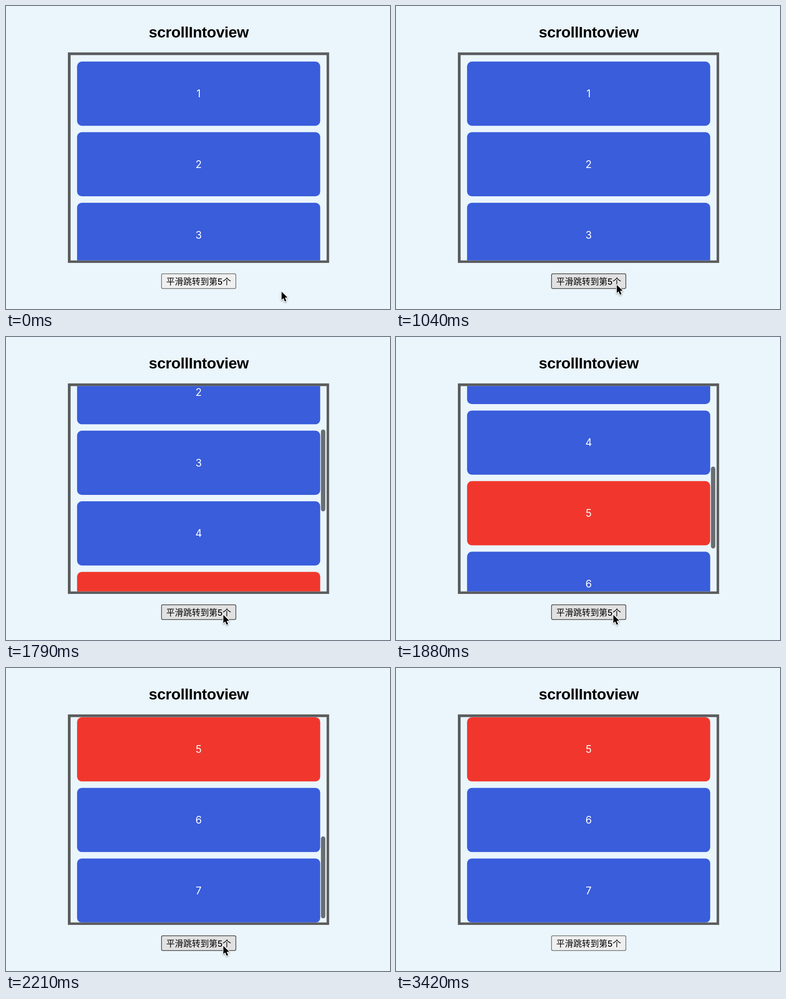
An HTML page with a canvas that plays this animation: 844x664 px, repeating every 3870 ms.

```html
<!DOCTYPE html>
<html lang="zh-CN">
<head>
<meta charset="utf-8">
<title>scrollIntoview</title>
<style>
  html, body { margin: 0; width: 100%; height: 100%; overflow: hidden; background: #eaf5fc; }
  canvas { display: block; }
</style>
</head>
<body>
<canvas id="stage" width="844" height="664"></canvas>
<script>
const ctx = document.getElementById('stage').getContext('2d');
const LOOP = 3870, STEP = 1000 / 24, LAST = 82;
const BG = '#eaf5fc', BLUE = '#395ddb', RED = '#f1372d', FRAME = '#5b5c5d';
const PITCH = 154.7, ITEM_H = 140.6, MAX_SCROLL = 632.6;
const SCROLL_START = 1590, SCROLL_TIME = 520;
const BUTTON = { x: 341, y: 586, w: 165, h: 34 };

const clamp = v => Math.min(1, Math.max(0, v));
const progress = (t, from, to) => clamp((t - from) / (to - from));
const smooth = p => p * p * (3 - 2 * p);
const easeIn = p => p * p;
const easeOut = p => 1 - (1 - p) * (1 - p);
const linear = p => p;

// Cursor moves: start, end, easing, then start, control and end points.
const MOVES = [
  [600, 1060, smooth, 605, 625, 545, 622, 484, 610],
  [1060, 1250, easeOut, 484, 610, 480, 609, 477, 608],
  [2230, 2670, smooth, 477, 608, 590, 664, 769, 573],
  [2790, 3290, easeIn, 769, 573, 790, 280, 771, 5],
  [3290, 3375, linear, 771, 5, 776, -15, 781, -35]
];
const ARROW = [[0, 0], [0, 18], [4, 14.3], [7.2, 21.6], [10.4, 20.2], [7.3, 13], [13, 12.7]];

function bezier(a, b, c, u) {
  const v = 1 - u;
  return v * v * a + 2 * u * v * b + u * u * c;
}

function cursorAt(t) {
  const move = MOVES.filter(m => m[0] <= t).pop() || MOVES[0];
  const [from, to, ease, x0, y0, cx, cy, x1, y1] = move;
  const u = ease(progress(t, from, to));
  return { x: bezier(x0, cx, x1, u), y: bezier(y0, cy, y1, u) };
}

// cubic-bezier(.453, 0, .436, 1)
function scrollEase(x) {
  let lo = 0, hi = 1;
  for (let i = 0; i < 24; i++) {
    const u = (lo + hi) / 2, v = 1 - u;
    if (3 * v * v * u * 0.453 + 3 * v * u * u * 0.436 + u * u * u < x) lo = u;
    else hi = u;
  }
  return smooth(hi);
}

function box(x, y, w, h, r, color) {
  ctx.beginPath();
  ctx.roundRect(x, y, w, h, r);
  ctx.fillStyle = color;
  ctx.fill();
}

function label(text, x, y, font, color, spacing = '0px') {
  ctx.font = font;
  ctx.letterSpacing = spacing;
  ctx.fillStyle = color;
  ctx.fillText(text, x, y);
}

function drawList(t) {
  const scroll = MAX_SCROLL * scrollEase(progress(t, SCROLL_START, SCROLL_START + SCROLL_TIME));
  ctx.fillStyle = FRAME;
  ctx.fillRect(136, 101.7, 574.2, 461.3);
  ctx.fillStyle = BG;
  ctx.fillRect(142, 107.6, 562.7, 450);
  ctx.save();
  ctx.beginPath();
  ctx.rect(142, 107.6, 562.7, 450);
  ctx.clip();
  for (let n = 1; n <= 7; n++) {
    const y = 121.8 + (n - 1) * PITCH - scroll;
    box(156.2, y, 534.4, ITEM_H, 10.5, n === 5 ? RED : BLUE);
    label(n, 423.4, y + 78.3, '22.5px Inter, "Liberation Sans", sans-serif', '#fff');
  }
  if (t > SCROLL_START) {
    const alpha = 0.55 * (1 - progress(t, 2620, 2850));
    box(692.2, 110.3 + scroll * 0.409, 9.6, 179.5, 4.8, `rgba(0,0,0,${alpha})`);
  }
  ctx.restore();
}

function drawButton(cursor) {
  const { x, y, w, h } = BUTTON;
  const hover = cursor.x > x && cursor.x < x + w && cursor.y > y && cursor.y < y + h;
  box(x, y, w, h, 4, hover ? '#444' : '#6f6f70');
  box(x + 1.5, y + 1.5, w - 3, h - 3, 2.7, hover ? '#e1e1e1' : '#efefef');
  label('平滑跳转到第5个', x + w / 2, 610.6, '500 18.75px Inter, "Noto Sans CJK SC", "Noto Sans CJK", sans-serif', '#000');
}

function drawCursor({ x, y }) {
  ctx.save();
  ctx.translate(x + 0.7, y + 1);
  ctx.beginPath();
  ARROW.forEach(p => ctx.lineTo(...p));
  ctx.closePath();
  ctx.lineJoin = 'round';
  ctx.lineWidth = 3;
  ctx.strokeStyle = '#fff';
  ctx.shadowColor = 'rgba(0,0,0,.35)';
  ctx.shadowBlur = 3;
  ctx.shadowOffsetY = 1.5;
  ctx.stroke();
  ctx.shadowColor = 'transparent';
  ctx.fillStyle = '#000';
  ctx.fill();
  ctx.restore();
}

function draw(t) {
  const cursor = cursorAt(t);
  ctx.fillStyle = BG;
  ctx.fillRect(0, 0, 844, 664);
  ctx.textAlign = 'center';
  label('scrollIntoview', 423.5, 68.5, 'bold 33.75px "Liberation Sans", Arial, sans-serif', '#000', '-0.4px');
  drawList(t);
  drawButton(cursor);
  drawCursor(cursor);
}

const start = performance.now();
function tick() {
  const t = (performance.now() - start) % LOOP;
  // The picture advances at 24 steps per second.
  draw(Math.min(LAST, Math.floor((t + 5) / STEP)) * STEP);
  requestAnimationFrame(tick);
}
tick();
</script>
</body>
</html>
```
